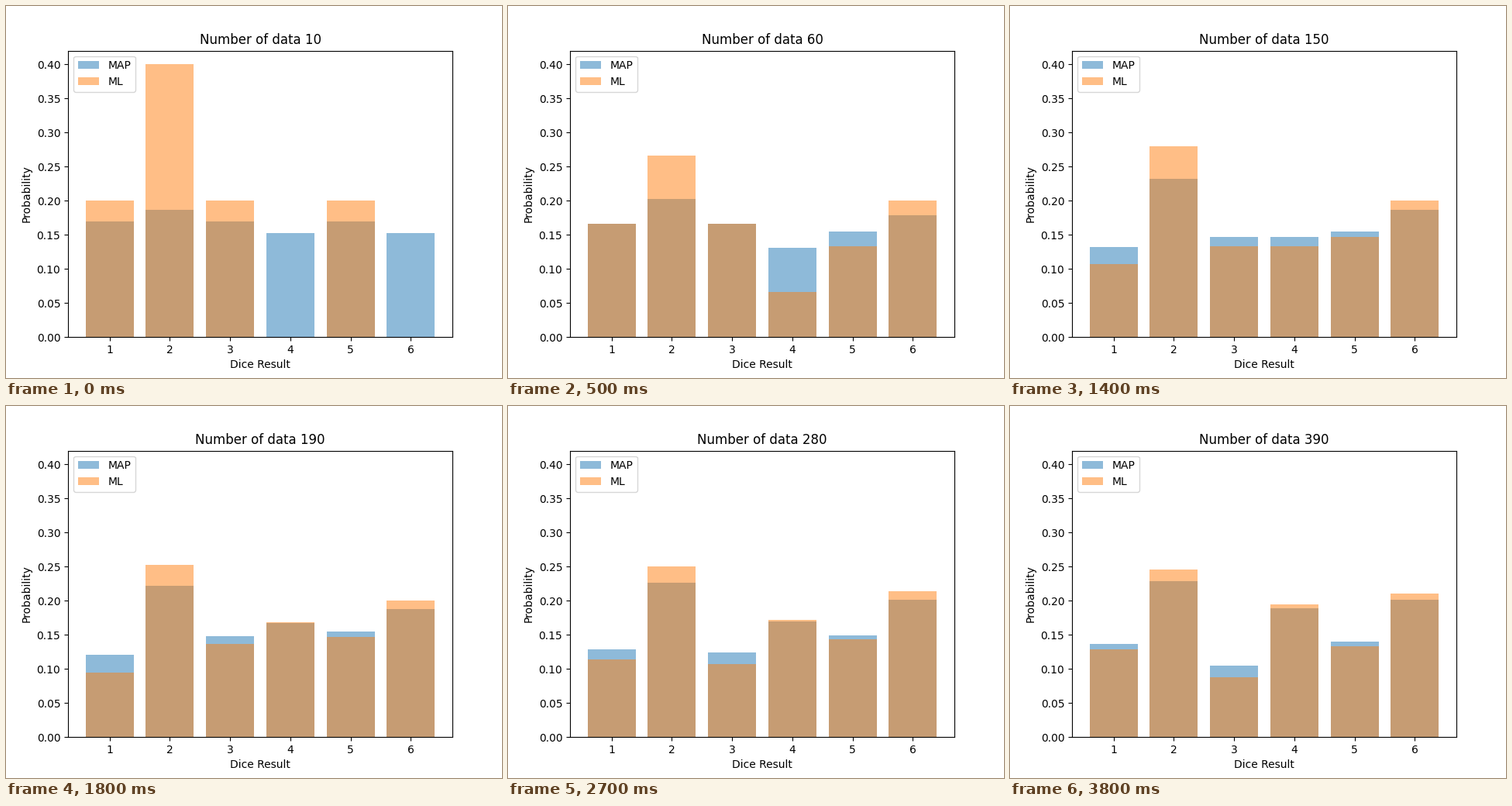
A matplotlib script that plays this animation: 640x480 px, repeating every 3.9 s.

```python
import numpy as np
import matplotlib.pyplot as plt
from matplotlib.animation import FuncAnimation

STEP = 10      # data added per frame
FRAMES = 39
PRIOR = 18     # pseudo-count of each face
FACES = np.arange(1, 7)

# Key points of the run: pairs of throws seen so far for each face
KEYS = np.array([
    (1, 2, 1, 0, 1, 0),
    (5, 8, 5, 2, 4, 6),
    (7, 17, 6, 5, 9, 11),
    (9, 24, 13, 16, 14, 19),
    (12, 29, 14, 20, 19, 26),
    (20, 40, 15, 28, 22, 35),
    (25, 48, 17, 38, 26, 41),
])


def counts_at(n):
    """Counts after n data: steady growth between keys, in whole pairs."""
    pairs = n // 2
    exact = np.array([np.interp(pairs, KEYS.sum(axis=1), face) for face in KEYS.T])
    whole = np.floor(exact + 1e-9)
    rest = np.round(exact - whole, 6)
    missing = int(pairs - whole.sum())
    whole[np.argsort(-rest, kind="stable")[:missing]] += 1
    return 2 * whole


def estimates(n):
    counts = counts_at(n)
    return (counts + PRIOR) / (n + 6 * PRIOR), counts / n


fig, ax = plt.subplots(figsize=(6.4, 4.8), dpi=100)
groups = [ax.bar(FACES, heights, alpha=0.5, label=label)
          for label, heights in zip(("MAP", "ML"), estimates(STEP))]
ax.set_ylim(0, 0.42)
ax.set_xlabel("Dice Result")
ax.set_ylabel("Probability")
ax.legend(loc="upper left")
title = ax.set_title(f"Number of data {STEP}")


def draw(frame):
    n = STEP * (frame + 1)
    for bars, heights in zip(groups, estimates(n)):
        for bar, height in zip(bars, heights):
            bar.set_height(height)
    title.set_text(f"Number of data {n}")
    return [*groups[0], *groups[1], title]


anim = FuncAnimation(fig, draw, frames=FRAMES, interval=100, repeat=True)
plt.show()
```
